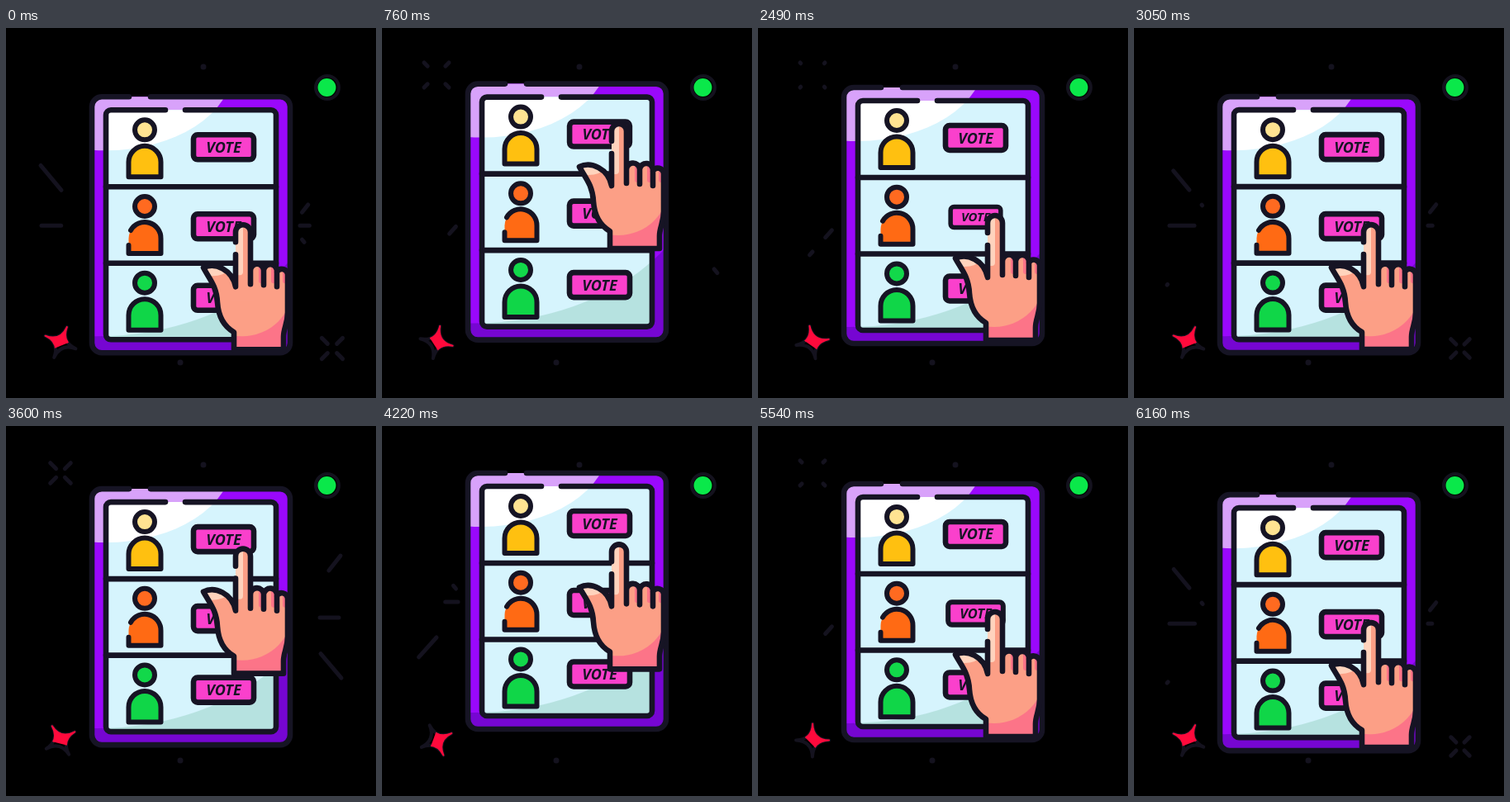
An HTML page with a canvas for the animation above (6.23 s loop, 448 by 448 pixels).

```html
<!DOCTYPE html>
<html lang="en">
<head>
<meta charset="utf-8">
<title>Vote</title>
<style>
html, body { margin: 0; width: 100%; height: 100%; overflow: hidden; background: #000; }
canvas { display: block; width: 448px; height: 448px; }
</style>
</head>
<body>
<canvas id="stage" width="448" height="448"></canvas>
<script>
const ctx = document.getElementById('stage').getContext('2d');
const CYCLE = 3115, BURST = CYCLE / 2, TAU = Math.PI * 2;
const INK = '#161424', FAINT = '#14121e';
const SKIN = '#fc9f86', GLOW = '#ffd3bd', BLUSH = '#fc7488';

const clamp = v => Math.max(0, Math.min(1, v));
const smooth = v => v * v * (3 - 2 * v);
const wrap = (v, n) => ((v % n) + n) % n;

// Hand height relative to the tablet: [ms, px]
const HAND = [[0, 0], [150, 0], [590, -96], [740, -107], [890, -98], [1010, -96],
  [1400, 84], [1950, 84], [2380, 0], [CYCLE, 0]];
const ROWS = [
  { button: 145, press: 900, head: '#ffe392', body: '#ffc010' },
  { button: 241, press: 2500, head: '#ff6a20', body: '#ff6a14' },
  { button: 327.5, press: 1500, head: '#12d84a', body: '#10d648' }
];

function keyed(keys, t) {
  let i = 1;
  while (i < keys.length - 1 && keys[i][0] < t) i++;
  const [t0, a] = keys[i - 1], [t1, b] = keys[i];
  return a + (b - a) * smooth(clamp((t - t0) / (t1 - t0)));
}

function paint(path, fill, stroke = INK, width = 6.6) {
  if (fill) { ctx.fillStyle = fill; ctx.fill(path); }
  if (stroke) { ctx.strokeStyle = stroke; ctx.lineWidth = width; ctx.stroke(path); }
}

function round(x, y, w, h, r) {
  const p = new Path2D();
  p.roundRect(x, y, w, h, r);
  return p;
}

function oval(x, y, rx, ry = rx) {
  const p = new Path2D();
  p.ellipse(x, y, rx, ry, 0, 0, TAU);
  return p;
}

function at(x, y, draw) {
  ctx.save();
  ctx.translate(x, y);
  draw();
  ctx.restore();
}

// Fills a shape with shade, base colour and highlight
function shaded(shape, dark, mid, light) {
  ctx.save();
  ctx.clip(shape);
  paint(shape, dark, null);
  paint(oval(110, 160, 285, 214), mid, null);
  paint(oval(120, 50, 154, 99), light, null);
  ctx.restore();
}

// Line that grows from its start and then leaves through its end
function ray(t, start, x0, y0, x1, y1, pieces = [[0, 1]]) {
  const age = wrap(t - start, BURST);
  const head = clamp(age / 500), tail = clamp((age - 350) / 500);
  ctx.strokeStyle = FAINT;
  ctx.lineWidth = 5;
  for (const [from, to] of pieces) {
    const a = Math.max(from, tail), b = Math.min(to, head);
    if (b <= a) continue;
    ctx.beginPath();
    ctx.moveTo(x0 + (x1 - x0) * a, y0 + (y1 - y0) * a);
    ctx.lineTo(x0 + (x1 - x0) * b, y0 + (y1 - y0) * b);
    ctx.stroke();
  }
}

function rays(t) {
  const dashed = [[0.05, 0.2], [0.5, 1]];
  ray(t, 1050, 92, 227, 42, 167, dashed);
  ray(t, 950, 92, 240, 43, 240);
  ray(t, 650, 92, 254, 40, 312, dashed);
  ray(t, -220, 356, 227, 405, 165, dashed);
  ray(t, -120, 356, 240, 403, 240);
  ray(t, -50, 356, 254, 406, 313, dashed);
}

function cross(t, start, x, y) {
  for (const sx of [-1, 1]) for (const sy of [-1, 1]) {
    ray(t, start, x + sx * 5, y + sy * 5, x + sx * 15, y + sy * 15);
  }
}

function star(wave) {
  const turn = (-30 - 82 * wave) * Math.PI / 180;
  const p = new Path2D();
  const point = (k, r) => [Math.cos(k * TAU / 8) * r, Math.sin(k * TAU / 8) * r];
  p.moveTo(...point(1, 20));
  for (let k = 1; k < 9; k += 2) p.quadraticCurveTo(...point(k + 1, 1), ...point(k + 2, 20));
  p.closePath();
  at(66, 380.5, () => {
    ctx.rotate(turn);
    paint(p, null, FAINT, 4);
    ctx.beginPath();
    ctx.rect(-4, -30, 40, 60);
    ctx.clip();
    paint(p, '#ff0a3c', '#ff0a3c', 2);
  });
}

function person(row, i) {
  at(168, 124 + i * 92.7, () => {
    paint(oval(0, 0, 12), row.head, INK, 6);
    const body = new Path2D('M-19.5 57V39a19.5 19.5 0 0 1 39 0V57Z');
    paint(body, row.body, i === 1 ? null : INK, 6);
    if (i === 1) paint(new Path2D('M-17 29A19.5 19.5 0 0 1 19.5 39V57H-19.5V47'), null, INK, 6);
  });
}

function button(row, t) {
  const press = smooth(clamp(1 - Math.abs(t - row.press) / 150));
  at(263.5, row.button, () => {
    const s = 1 - 0.17 * press;
    ctx.scale(s, s);
    paint(round(-36.5, -15, 73, 30, 5), '#fa40cc');
    ctx.fillStyle = INK;
    ctx.font = 'italic 700 18px "Open Sans", sans-serif';
    ctx.textAlign = 'center';
    ctx.fillText('VOTE', 0, 6.5);
  });
}

function tablet(t) {
  shaded(round(104, 84, 240, 310, 12), '#7606d2', '#9a08fc', '#d8a2fa');
  paint(new Path2D('M175 84H332a12 12 0 0 1 12 12V382a12 12 0 0 1 -12 12H116a12 12 0 0 1 -12 -12V96a12 12 0 0 1 12 -12H149'));
  shaded(round(121, 100, 206, 278, 6), '#b6e2e0', '#d6f4fd', '#ffffff');
  paint(new Path2D('M217 100H321a6 6 0 0 1 6 6V372a6 6 0 0 1 -6 6H127a6 6 0 0 1 -6 -6V106a6 6 0 0 1 6 -6H193'));
  paint(new Path2D('M121 193H327M121 285.5H327'));
  ROWS.forEach((row, i) => { person(row, i); button(row, t); });
}

// Outline from the little finger round the wrist and thumb to the index finger
const SIDE = 'a7 7 0 0 1 13 3V345C341 359 336 364 336 375V390H276V369' +
  'C262 361 257 348 256 333C255 313 246 304 239 291C253 284 274 293 278 314';
const PALM = new Path2D('M278 314V248a9 9 0 0 1 18 0V295a8 8 0 0 1 16 -1a8 8 0 0 1 16 2' + SIDE + 'Z');
const LINES = new Path2D('M278 260V248a9 9 0 0 1 18 0V311M296 295a8 8 0 0 1 16 -1V312' +
  'M312 294a8 8 0 0 1 16 2V314M328 296' + SIDE + 'V275');

function hand() {
  ctx.save();
  ctx.clip(PALM);
  paint(PALM, BLUSH, null);
  paint(oval(286, 312, 62, 62), SKIN, null);
  paint(round(272, 230, 28, 100, 0), SKIN, null);
  paint(round(278, 238, 9, 62, 4), GLOW, null);
  paint(oval(250, 294, 17, 7), GLOW, null);
  for (const x of [306, 321, 335]) paint(round(x, 284, 7, 26, 3), BLUSH, null);
  ctx.restore();
  paint(LINES);
}

function render(now) {
  const t = wrap(now, CYCLE), wave = Math.cos(t / CYCLE * TAU);
  const lift = -0.7 - 16.3 * (1 - wave);
  ctx.fillStyle = '#000';
  ctx.fillRect(0, 0, 448, 448);
  ctx.lineCap = ctx.lineJoin = 'round';

  paint(oval(239, 47, 3.5), FAINT, null);
  paint(oval(211, 405, 3.5), FAINT, null);
  paint(oval(389, 72, 14), null, FAINT, 4);
  paint(oval(388.5, 72, 11), '#0ae84a', null);
  cross(t, 120, 66, 57);
  cross(t, -380, 395, 388);
  star(wave);
  at(0, lift, () => { rays(t); tablet(t); });
  at(0, lift + keyed(HAND, t), hand);
}

const begin = performance.now();
function frame() {
  render(performance.now() - begin);
  requestAnimationFrame(frame);
}
frame();
</script>
</body>
</html>
```
